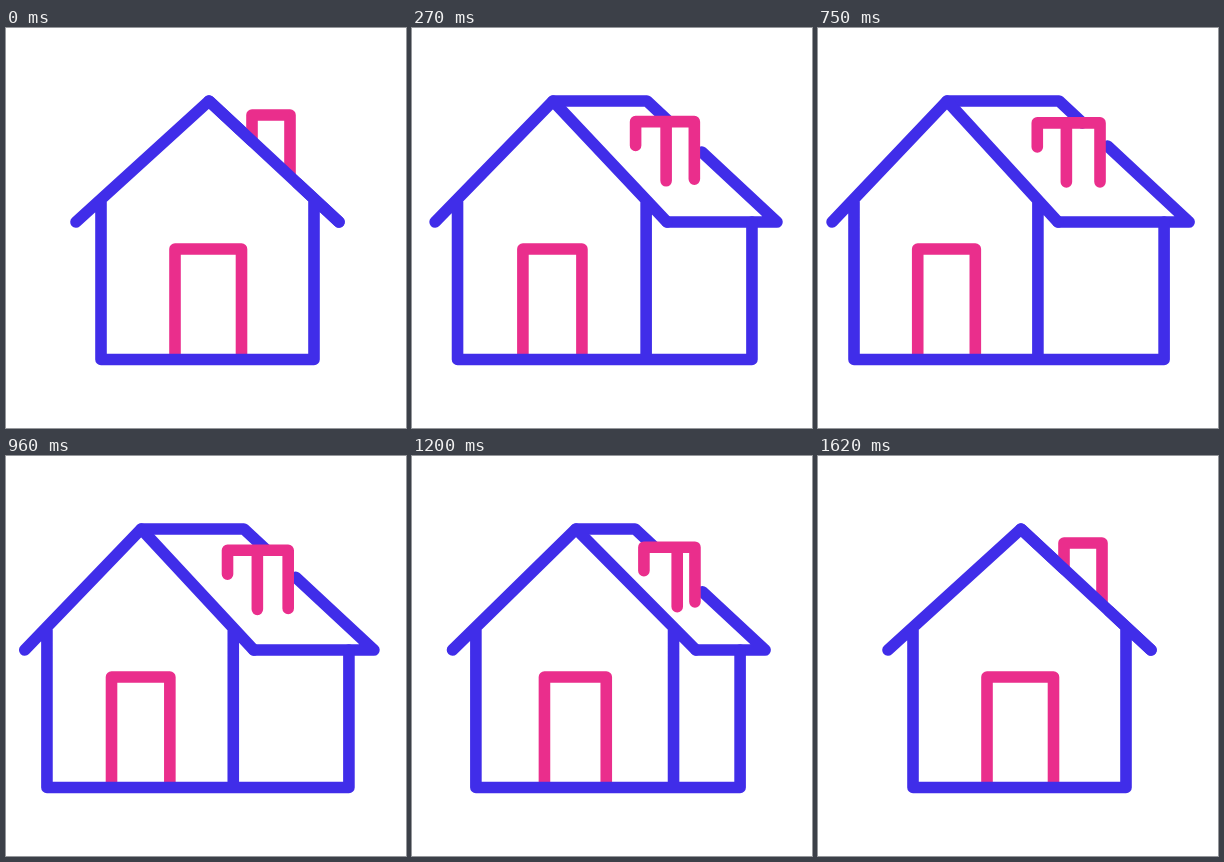
Write an HTML page that moves like this. It is 400x400 px and loops after 2.65 s.

```html
<!DOCTYPE html>
<html>
<head>
<meta charset="utf-8">
<title>Turning house</title>
<style>
  html, body { margin: 0; height: 100%; overflow: hidden; background: #fff; }
  svg { display: block; width: 100%; height: 100%; }
  path { fill: none; stroke: #402de9; stroke-width: 11.6; stroke-linecap: round; stroke-linejoin: round; }
  .pink { stroke: #ea2e8c; }
</style>
</head>
<body>
<svg viewBox="0 0 400 400">
  <path id="back"/>
  <path id="trim" class="pink"/>
  <path id="front"/>
</svg>
<script>
const LOOP = 2650, STEP = 30, END = 1620;

// [time, turn]: 0 faces the viewer, 1 is fully turned
const keys = [[0, 0], [130, .42], [270, .83], [510, .985], [700, 1], [960, .907],
  [1080, .785], [1200, .522], [1380, .107], [1530, .01], [END, 0]];

const slope = i => {
  const a = keys[i - 1], b = keys[i + 1];
  return a && b ? (b[1] - a[1]) / (b[0] - a[0]) : 0;
};

// Smooth curve through the keys
function turnAt(t) {
  let i = 0;
  while (i < keys.length - 2 && t > keys[i + 1][0]) i++;
  const [t0, a] = keys[i], [t1, b] = keys[i + 1];
  const h = t1 - t0, u = (t - t0) / h, v = 1 - u;
  const p = v * v * (1 + 2 * u) * a + u * u * (3 - 2 * u) * b
    + h * u * v * (v * slope(i) - u * slope(i + 1));
  return Math.min(1, Math.max(0, p));
}

const line = (...pts) => 'M' + pts.map(p => p.join()).join('L');
const set = (id, ...lines) =>
  document.getElementById(id).setAttribute('d', lines.join(''));

function draw(p) {
  const ridge = 73, eave = 194, floor = 331.5, wallTop = 174;
  const apex = 203 - 74.7 * p, backApex = 203 + 38.5 * p;
  const eaveL = 70 - 56.5 * p, eaveM = 333 - 94 * p, eaveR = 333 + 38.5 * p;
  const wallL = 95 - 59.6 * p, wallM = 308 - 89 * p, wallR = 308 + 38.5 * p;
  const doorL = 169 - 70 * p, doorR = 235.5 - 79 * p;
  const stackL = 246 - 27 * p, stackM = 284 - 36 * p, stackR = 284 - 2 * p;
  const top = 87 + 8 * p;

  // The far roof edge is interrupted by the chimney
  const pitch = (eave - ridge) / 130;
  const onEdge = x => [x, ridge + (x - backApex) * pitch];
  const cut = Math.max(stackL, backApex + (top - ridge) / pitch);

  set('back',
    line([apex, ridge], [backApex, ridge], onEdge(cut)),
    line(onEdge(stackR + 7.5), [eaveR, eave], [eaveM, eave]));
  set('trim',
    line([doorL, floor - 3], [doorL, 221], [doorR, 221], [doorR, floor - 3]),
    line([stackL, 110 + 9 * p], [stackL, top], [stackR, top], [stackR, 137 + 17 * p]),
    line([stackM, top], [stackM, 147 + 7 * p]));
  set('front',
    line([eaveL, eave], [apex, ridge], [eaveM, eave]),
    line([wallL, wallTop], [wallL, floor], [wallR, floor], [wallR, eave]),
    line([wallM, wallTop], [wallM, floor]));
}

function frame() {
  const t = performance.now() % LOOP;
  draw(turnAt(Math.min(END, Math.floor(t / STEP) * STEP)));
  requestAnimationFrame(frame);
}
frame();
</script>
</body>
</html>
```
